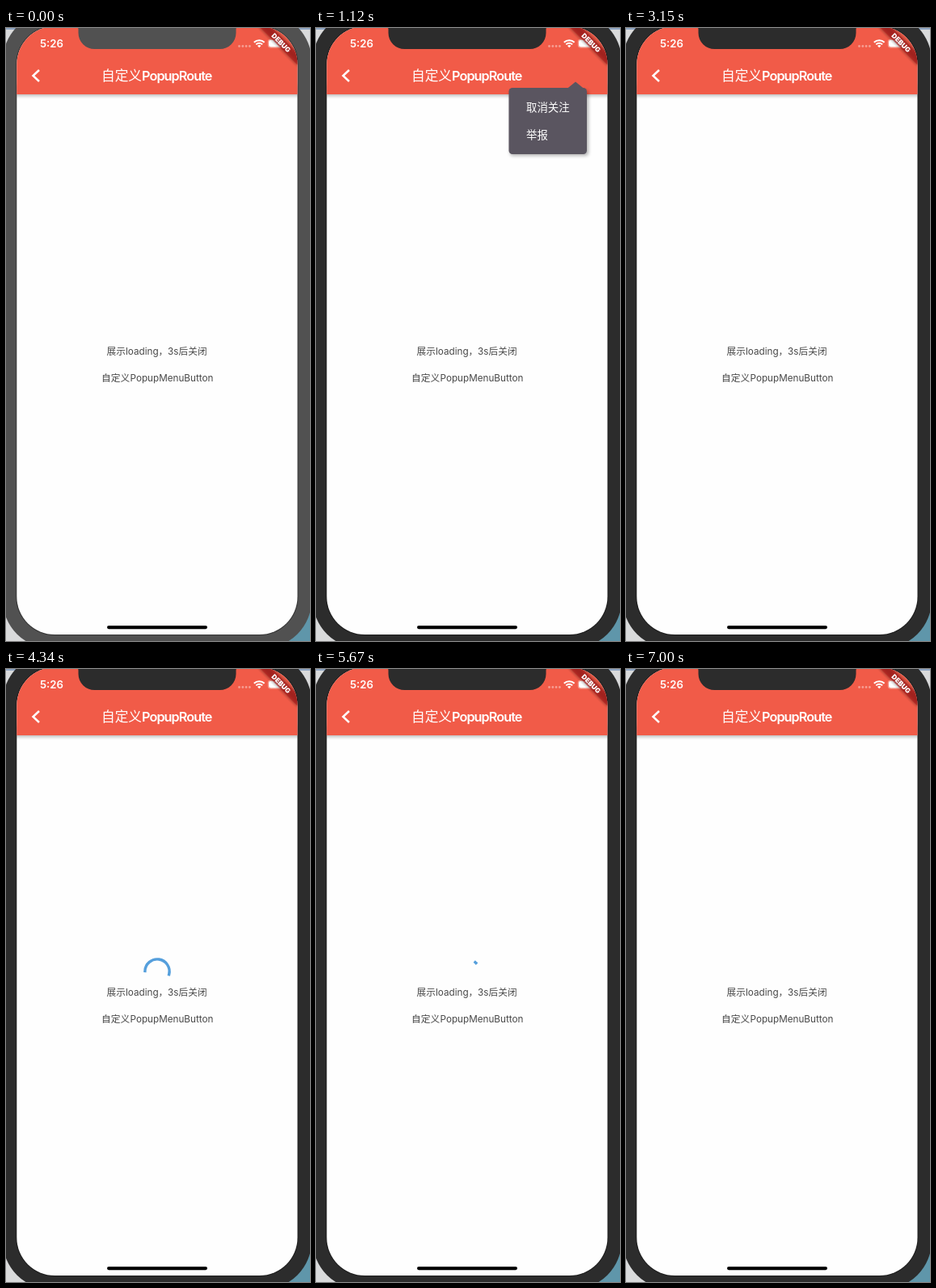
These frames come from a looping animation (376x758 px, 7.21 s). An HTML page:

```html
<!DOCTYPE html>
<html lang="zh-CN">
<head>
<meta charset="utf-8">
<title>PopupRoute</title>
<style>
  html, body { margin: 0; width: 100%; height: 100%; overflow: hidden; }
  svg { display: block; width: 376px; height: 758px; }
  text { font-family: Inter, "Noto Sans CJK SC", "Noto Sans CJK", sans-serif; }
  .title { font-size: 16.7px; font-weight: 500; fill: #fff; }
  .title.latin { font-size: 16.2px; font-weight: 600; letter-spacing: -.9px; }
  .body { font-size: 11.7px; fill: #484848; }
  .item { font-size: 13.4px; fill: #fff; }
</style>
</head>
<body>
<svg viewBox="0 0 376 758">
  <defs>
    <clipPath id="screen"><rect x="13.3" y="-2" width="347.2" height="752" rx="47"/></clipPath>
    <filter id="soft" x="-20%" y="-30%" width="140%" height="160%"><feGaussianBlur stdDeviation="2.2"/></filter>
  </defs>

  <!-- desktop behind the device -->
  <rect width="376" height="758" fill="#d9dadb"/>
  <rect width="376" height="2" fill="#8fa5c2"/>
  <rect x="300" y="690" width="76" height="68" fill="#5f96aa"/>

  <g id="bezel" fill="#515151">
    <rect x="-4" y="-19" width="382" height="786" rx="60"/>
  </g>
  <rect x="13.3" y="-2" width="347.2" height="752" rx="47" fill="none" stroke="#000" stroke-width="2" opacity=".35"/>

  <g clip-path="url(#screen)">
    <rect width="376" height="758" fill="#fefefe"/>
    <rect y="70" width="376" height="14" fill="#000" opacity=".27" filter="url(#soft)"/>
    <rect y="-2" width="376" height="84" fill="#f15b48"/>
    <path d="M41 52 33.5 59 41 66" fill="none" stroke="#fff" stroke-width="2.5"/>
    <text class="title" x="118" y="65">自定义</text>
    <text class="title latin" x="168" y="65">PopupRoute</text>

    <text x="42" y="24" font-size="13.2" font-weight="600" fill="#fff">5:26</text>
    <g fill="#fff" opacity=".4">
      <circle cx="288.5" cy="22.5" r="1.4"/><circle cx="292.8" cy="22.5" r="1.4"/>
      <circle cx="297.1" cy="22.5" r="1.4"/><circle cx="301.4" cy="22.5" r="1.4"/>
    </g>
    <g fill="none" stroke="#fff" stroke-width="2">
      <path d="M306.8 17.8a9 9 0 0 1 12.8 0M309.3 20.4a5.5 5.5 0 0 1 7.8 0"/>
      <path d="M313.2 24.3 311 22a3.2 3.2 0 0 1 4.4 0Z" fill="#fff" stroke="none"/>
    </g>
    <rect x="325" y="14.8" width="18" height="8.6" rx="2.4" fill="#fff"/>
    <rect x="324.2" y="14" width="19.6" height="10.2" rx="3" fill="none" stroke="#fff" stroke-width=".8" opacity=".5"/>

    <text class="body" x="124.5" y="403.7">展示</text>
    <text class="body" x="148" y="403.7">loading</text>
    <text class="body" x="188.5" y="403.7">，</text>
    <text class="body" x="200" y="403.7">3s</text>
    <text class="body" x="213.5" y="403.7">后关闭</text>
    <text class="body" x="118" y="437.3">自定义</text>
    <text class="body" x="153.5" y="437.3">PopupMenuButton</text>

    <g id="menu" visibility="hidden">
      <rect x="240" y="77" width="97" height="81" rx="4" fill="#000" opacity=".3" filter="url(#soft)"/>
      <path d="M310.5 75 321 66.5 331.5 75Z" fill="#5a5560"/>
      <rect x="238.5" y="74" width="96.5" height="82" rx="4.5" fill="#5a5560"/>
      <text class="item" x="260" y="103">取消关注</text>
      <text class="item" x="260" y="136.7">举报</text>
    </g>

    <path id="spinner" fill="none" stroke="#559fdc" stroke-width="3.4" stroke-linecap="square"/>

    <rect x="125" y="739" width="124" height="4.2" rx="2.1" fill="#000"/>

    <g transform="translate(360.5 -2) rotate(45)">
      <rect x="-33.5" y="23.5" width="67" height="10" fill="#000" opacity=".5" filter="url(#soft)"/>
      <rect x="-33.5" y="23.5" width="67" height="10" fill="#b71c1c" opacity=".63"/>
      <text y="31.6" font-size="8.4" font-weight="900" fill="#fff" text-anchor="middle">DEBUG</text>
    </g>
  </g>

  <path id="notch" fill="#515151" d="M86 -2Q89.5 -2 89.5 2V6A20 20 0 0 0 109.5 26H264.5A20 20 0 0 0 284.5 6V2Q284.5 -2 288 -2Z"/>
</svg>
<script>
  const LOOP = 7210, STEP = 70, LAST = 7000;
  const ACTIVE_AT = 980;
  const MENU = [1050, 2380];
  const SPINNER = { from: 3600, to: 7000, start: 3680, period: 1039, x: 187, y: 374, r: 15.1 };
  const $ = id => document.getElementById(id);
  const within = (t, from, to) => t >= from && t < to;
  const clamp = v => Math.min(1, Math.max(0, v));

  // cubic-bezier(.4, 0, .2, 1), solved by bisection
  function fastOutSlowIn(x) {
    let lo = 0, hi = 1, s = .5;
    for (let i = 0; i < 24; i++) {
      s = (lo + hi) / 2;
      const bx = 1.2 * s * (1 - s) ** 2 + .6 * s * s * (1 - s) + s ** 3;
      if (bx < x) lo = s; else hi = s;
    }
    return s * s * (3 - 2 * s);
  }

  function arcPath(t) {
    const { start, period, x, y, r } = SPINNER;
    const turns = Math.max(0, (t - start) / period);
    const cycle = Math.floor(turns), phase = turns - cycle;
    const head = fastOutSlowIn(clamp(phase * 2));
    const tail = fastOutSlowIn(clamp(phase * 2 - 1));
    const a = Math.PI * (-.5 + 1.5 * tail + 1.7 * phase - .8 * cycle);
    const sweep = Math.max(1.5 * Math.PI * (head - tail), .01);
    const point = angle => `${(x + r * Math.cos(angle)).toFixed(3)} ${(y + r * Math.sin(angle)).toFixed(3)}`;
    return `M${point(a)}A${r} ${r} 0 ${sweep > Math.PI ? 1 : 0} 1 ${point(a + sweep)}`;
  }

  function draw() {
    const now = performance.now() % LOOP;
    const t = Math.min(LAST, Math.floor(now / STEP) * STEP);
    const shade = t < ACTIVE_AT ? '#515151' : '#2c2c2c';
    $('bezel').setAttribute('fill', shade);
    $('notch').setAttribute('fill', shade);
    $('menu').setAttribute('visibility', within(t, ...MENU) ? 'visible' : 'hidden');
    $('spinner').setAttribute('d', within(t, SPINNER.from, SPINNER.to) ? arcPath(t) : '');
    requestAnimationFrame(draw);
  }
  draw();
</script>
</body>
</html>
```
